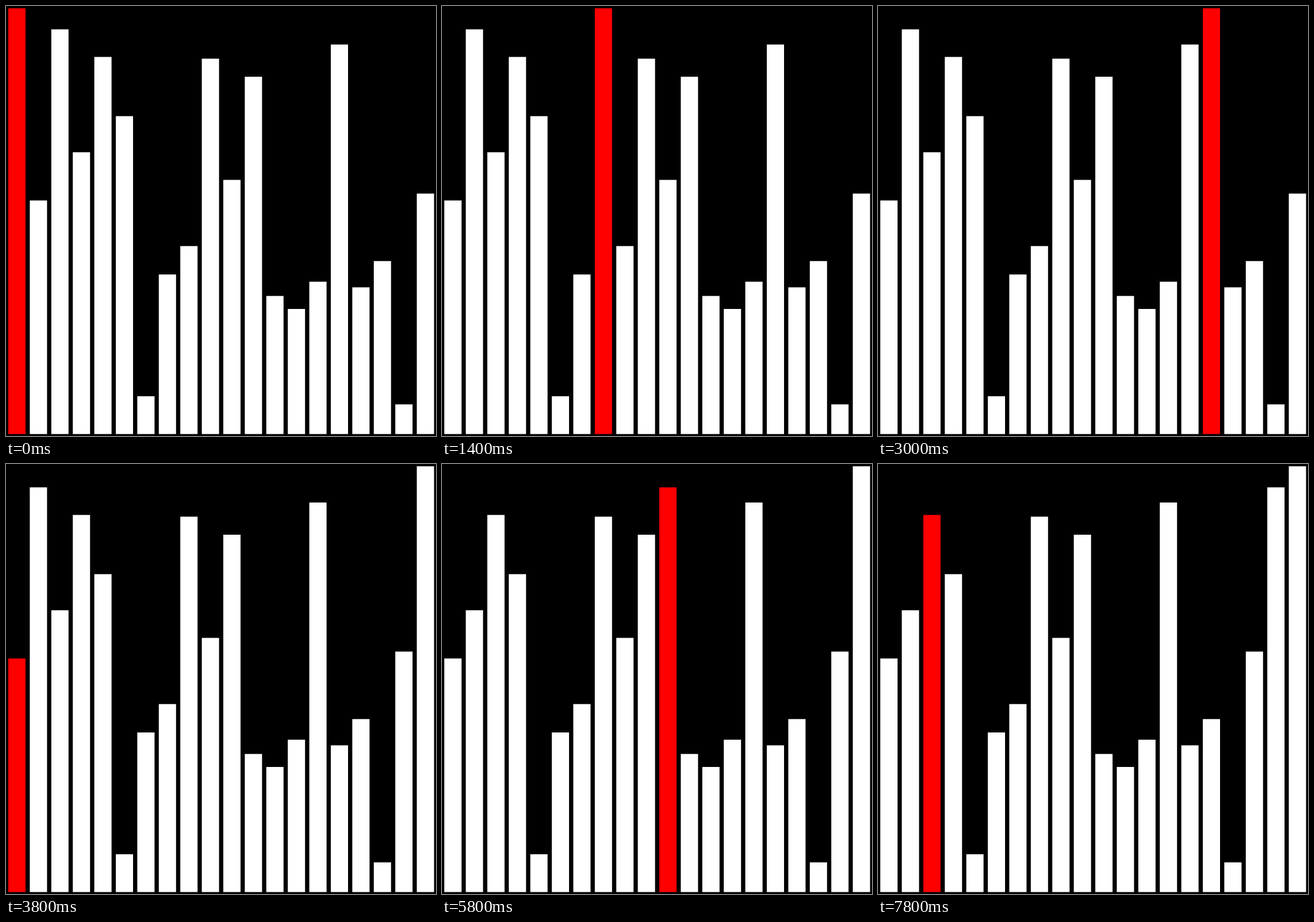
These frames come from a looping animation (748x748 px, 8 s). An HTML page:

```html
<!DOCTYPE html>
<html lang="en">
<head>
<meta charset="utf-8">
<title>Bubble sort</title>
<style>
  html, body { margin: 0; width: 100%; height: 100%; overflow: hidden; background: #000; }
  svg { display: block; width: 100%; height: 100%; }
</style>
</head>
<body>
<svg id="stage" viewBox="0 0 748 748"></svg>
<script>
const LOOP = 8000, STEP = 200;
const PITCH = 37.4, BAR = 30, EDGE = 4, FLOOR = 744.6;
const tops = [4, 338.3, 40.6, 254.4, 88.6, 191.6, 678.8, 467, 417.6, 91.6,
              302.5, 123, 504.4, 527, 479.6, 67, 489.4, 443.7, 693, 326.3];

const stage = document.getElementById('stage');
const bars = tops.map((_, i) => {
  const bar = document.createElementNS('http://www.w3.org/2000/svg', 'rect');
  bar.setAttribute('x', EDGE + PITCH * i);
  bar.setAttribute('width', BAR);
  return stage.appendChild(bar);
});

// Bubble sort state after a number of comparisons.
function sortState(steps) {
  const list = tops.slice();
  let cursor = 0, last = list.length - 1;
  while (steps-- > 0) {
    if (list[cursor] < list[cursor + 1]) {
      [list[cursor], list[cursor + 1]] = [list[cursor + 1], list[cursor]];
    }
    if (++cursor === last) {
      cursor = 0;
      last--;
    }
  }
  return { list, cursor };
}

let shown = -1;
function render(time) {
  const step = Math.floor((time % LOOP) / STEP);
  if (step === shown) return;
  shown = step;
  const { list, cursor } = sortState(step);
  bars.forEach((bar, i) => {
    bar.setAttribute('y', list[i]);
    bar.setAttribute('height', FLOOR - list[i]);
    bar.setAttribute('fill', i === cursor ? '#f00' : '#fff');
  });
}

const start = performance.now();
function tick() {
  render(performance.now() - start);
  requestAnimationFrame(tick);
}
tick();
</script>
</body>
</html>
```
